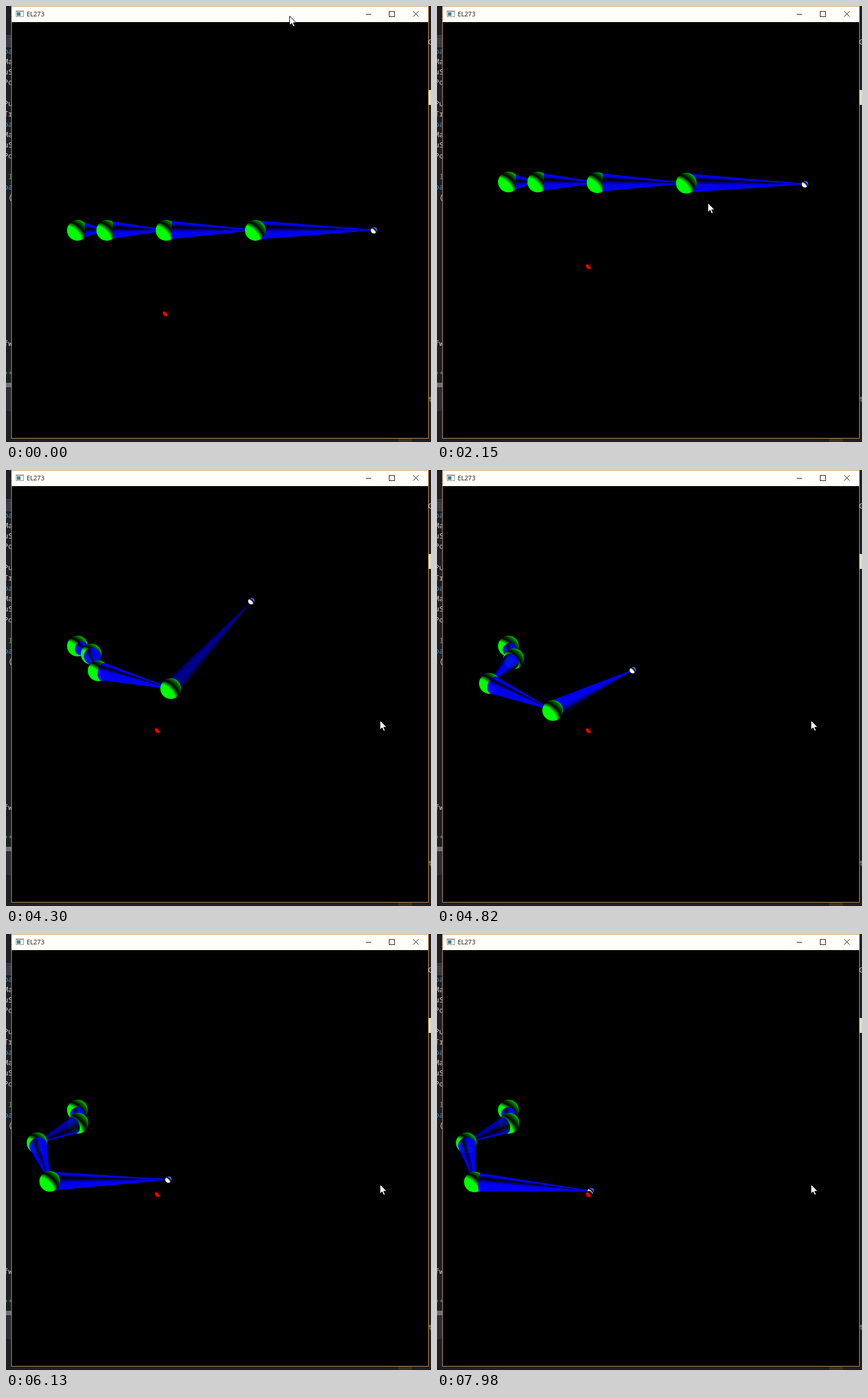
Write an HTML page with a canvas that moves like this. It is 738 by 758 pixels and loops after 8 s.

```html
<!DOCTYPE html>
<html lang="en">
<head>
<meta charset="utf-8">
<title>Arm solver</title>
<style>
html, body { margin: 0; width: 100%; height: 100%; overflow: hidden; background: #1f1f23; }
canvas { display: block; }
</style>
</head>
<body>
<canvas id="stage" width="738" height="758"></canvas>
<script>
const ctx = document.getElementById('stage').getContext('2d');
const LOOP = 8000, SOLVE_START = 3900, STEP = 107.4, SWING_STEPS = 9;
const LENGTHS = [51.5, 103, 155, 206], REACH = 515.5;
const BALL = 18, BASE = 16;
const LIGHT = [-.66, .66, .36], FRONT = 2.2, BACK = [.4, .9, 2.6];
const BLUE = [0, 0, 255];

// Where the joints and the tip are after the first swing, and where they settle.
const SWUNG = [[133, 328], [91, 371], [201, 417.5], [340, 348]];
const SETTLED = [[124.5, 329], [51, 362.5], [65, 431], [265.5, 449.5]];

const clamp = (v, lo, hi) => Math.min(hi, Math.max(lo, v));
const ramp = (t, from, to) => clamp((t - from) / (to - from), 0, 1);
const mix = (a, b, f) => a.map((v, i) => v + (b[i] - v) * f);

function straight(y, sag) {
  let x = 0;
  return [0, ...LENGTHS].map(len => {
    x += len;
    return [123.5 + x, y + sag * (x / REACH) ** 1.25];
  });
}

function swing(u) {
  const [root, ...rest] = straight(306, 18);
  const joints = rest.map((p, i) => mix(p, SWUNG[i], u));
  const [elbow, tip] = joints.slice(-2);
  const dx = tip[0] - elbow[0], dy = tip[1] - elbow[1] - 150 * Math.sin(Math.PI * u);
  const fit = Math.min(1, LENGTHS[3] / Math.hypot(dx, dy));
  joints[3] = [elbow[0] + dx * fit, elbow[1] + dy * fit];
  return [root, ...joints];
}

function settle(k) {
  const joints = SETTLED.map((p, i) => mix(p, SWUNG[i], Math.exp(-k * (i === 3 ? .125 : .21))));
  return [[123.5, 306], ...joints];
}

function pose(k, drag) {
  if (k < 0) return straight(389.5 - 83.5 * drag, 3.5 * drag);
  if (k < SWING_STEPS) return swing(1 - (1 - k / SWING_STEPS) ** 1.7);
  return settle(k - SWING_STEPS);
}

function pointerAt(t) {
  const a = ramp(t, 70, 1520), b = ramp(t, 1680, 2100), c = ramp(t, 2200, 2620);
  return [492 - 7 * a - 15 * b + 179 * c, 17 + 408 * a - 83 * b + 93 * c];
}

function shade(n, color) {
  const d = n[0] * LIGHT[0] + n[1] * LIGHT[1] + n[2] * LIGHT[2];
  return color.map((c, i) => c * Math.min(1, d > 0 ? FRONT * d : -d * BACK[i]));
}

function makeBall(r, color) {
  const c = document.createElement('canvas'), size = c.width = c.height = 2 * Math.ceil(r) + 2;
  const g = c.getContext('2d'), img = g.createImageData(size, size);
  for (let y = 0; y < size; y++) for (let x = 0; x < size; x++) {
    const nx = (x + .5 - size / 2) / r, ny = (y + .5 - size / 2) / r;
    const m = Math.hypot(nx, ny), nz = Math.sqrt(Math.max(0, 1 - m * m));
    img.data.set([...shade([nx, ny, nz], color), 255 * clamp(r - m * r + .5, 0, 1)], 4 * (y * size + x));
  }
  g.putImageData(img, 0, 0);
  return c;
}
const joint = makeBall(BALL, [0, 255, 0]);
const tip = makeBall(5.5, [255, 255, 255]);
const goal = makeBall(5.3, [255, 0, 0]);

function ball(sprite, [x, y]) {
  ctx.drawImage(sprite, Math.round(x - sprite.width / 2), Math.round(y - sprite.height / 2));
}

// The cone is shown from the circle where it leaves the joint's ball up to its apex.
function cone([ax, ay], [bx, by], len, side) {
  const flat = Math.hypot(bx - ax, by - ay), ux = (bx - ax) / flat, uy = (by - ay) / flat;
  const h = Math.min(1, flat / len), dz = side * Math.sqrt(1 - h * h);
  const dx = ux * h, dy = uy * h, slope = BASE / len;
  const A = 1 + slope * slope, B = 2 * BASE * slope, C = BALL * BALL - BASE * BASE;
  const s = (B + Math.sqrt(B * B + 4 * A * C)) / (2 * A), r = BASE - s * slope;
  const p = [-uy, ux, 0], q = [-dz * ux, -dz * uy, h];
  const radial = a => p.map((v, i) => v * Math.cos(a) + q[i] * Math.sin(a));
  const N = 72, w = Math.PI / N;
  for (let i = 0; i < N; i++) {
    const a = i * 2 * w, m = radial(a);
    const n = [m[0] + dx * slope, m[1] + dy * slope, m[2] + dz * slope];
    if (n[2] <= 0) continue;
    ctx.fillStyle = ctx.strokeStyle = `rgb(${shade(n, BLUE).map(Math.round)})`;
    ctx.lineWidth = .4;
    ctx.beginPath();
    ctx.moveTo(bx, by);
    for (const e of [a - w, a + w]) {
      const v = radial(e);
      ctx.lineTo(ax + dx * s + v[0] * r, ay + dy * s + v[1] * r);
    }
    ctx.closePath();
    ctx.fill();
    ctx.stroke();
  }
}

function rect(color, x, y, w, h) {
  ctx.fillStyle = color;
  ctx.fillRect(x, y, w, h);
}

function text(s, x, y, color, font = '13px "Noto Sans Mono", "DejaVu Sans Mono", monospace') {
  ctx.font = font;
  ctx.fillStyle = color;
  ctx.fillText(s, x, y);
}

function editor() {
  rect('#1f1f23', 0, 0, 738, 758);
  rect('#24506a', 0, 51, 9, 2);
  rect('#3c3c42', 0, 54, 9, 18);
  rect('#707074', 0, 655, 9, 8);
  rect('#2d2d33', 0, 664, 9, 40);
  rect('#e6dcc0', 734, 146, 4, 26);
  rect('#33312a', 681, 752, 24, 6);
  const code = 'pa,Ma,uS,Po,,Pu,Tr,pa,Ma,uS,Po,, I,pa, (';
  code.split(',').forEach((s, i) => {
    const color = s === 'pa' ? '#4a94c8' : s === ' I' ? '#4a9a45' : '#c8c8c8';
    text(s, -4, 83 + i * 18.15, color);
  });
  text('fw', -4, 591, '#c8c8c8');
  text('**', -4, 645, '#4a9a45');
  text('G', 733, 67, '#c8c8c8');
  text('t', 733, 688, '#b0a878');
}

function frame() {
  rect('#c8965a', 9, 0, 725, 752);
  rect('#fffefa', 10, 1, 723, 27);
  rect('#000', 10, 28, 723, 723);
  rect('#8c969c', 17, 8, 14, 11);
  rect('#f4f6f6', 18, 10, 12, 8);
  rect('#3f8585', 19, 11, 6, 6);
  text('EL273', 36, 18, '#111', '11px "Open Sans", sans-serif');
  rect('#111', 625, 14, 9, 1);
  ctx.strokeStyle = '#111';
  ctx.lineWidth = 1;
  ctx.strokeRect(665.5, 9.5, 9, 9);
  ctx.stroke(new Path2D('M707 9l9.5 9.5M716.5 9l-9.5 9.5'));
}

function pointer([x, y]) {
  const arrow = new Path2D('M0 0V16L3.7 12.6L6.2 18.3L8.8 17.2L6.3 11.6H11.5Z');
  ctx.save();
  ctx.translate(Math.round(x) + .5, Math.round(y) + .5);
  ctx.fillStyle = '#fff';
  ctx.strokeStyle = '#000';
  ctx.lineWidth = 1;
  ctx.fill(arrow);
  ctx.stroke(arrow);
  ctx.restore();
}

function draw(t) {
  const drag = ramp(t, 1680, 2100);
  const k = t < SOLVE_START ? -1 : Math.floor((t - SOLVE_START) / STEP + .45);
  const joints = pose(k, drag);
  editor();
  frame();
  LENGTHS.forEach((len, i) => {
    // The last bone points away from the viewer until the arm has nearly settled.
    const away = i === 3 && k < 23;
    if (!away) ball(joint, joints[i]);
    cone(joints[i], joints[i + 1], len, away ? -1 : 1);
    if (away) ball(joint, joints[i]);
  });
  ball(tip, joints[4]);
  ball(goal, [278 - 14 * drag, 534 - 82 * drag]);
  pointer(pointerAt(t));
}

function tick() {
  draw(performance.now() % LOOP);
  requestAnimationFrame(tick);
}
tick();
</script>
</body>
</html>
```
